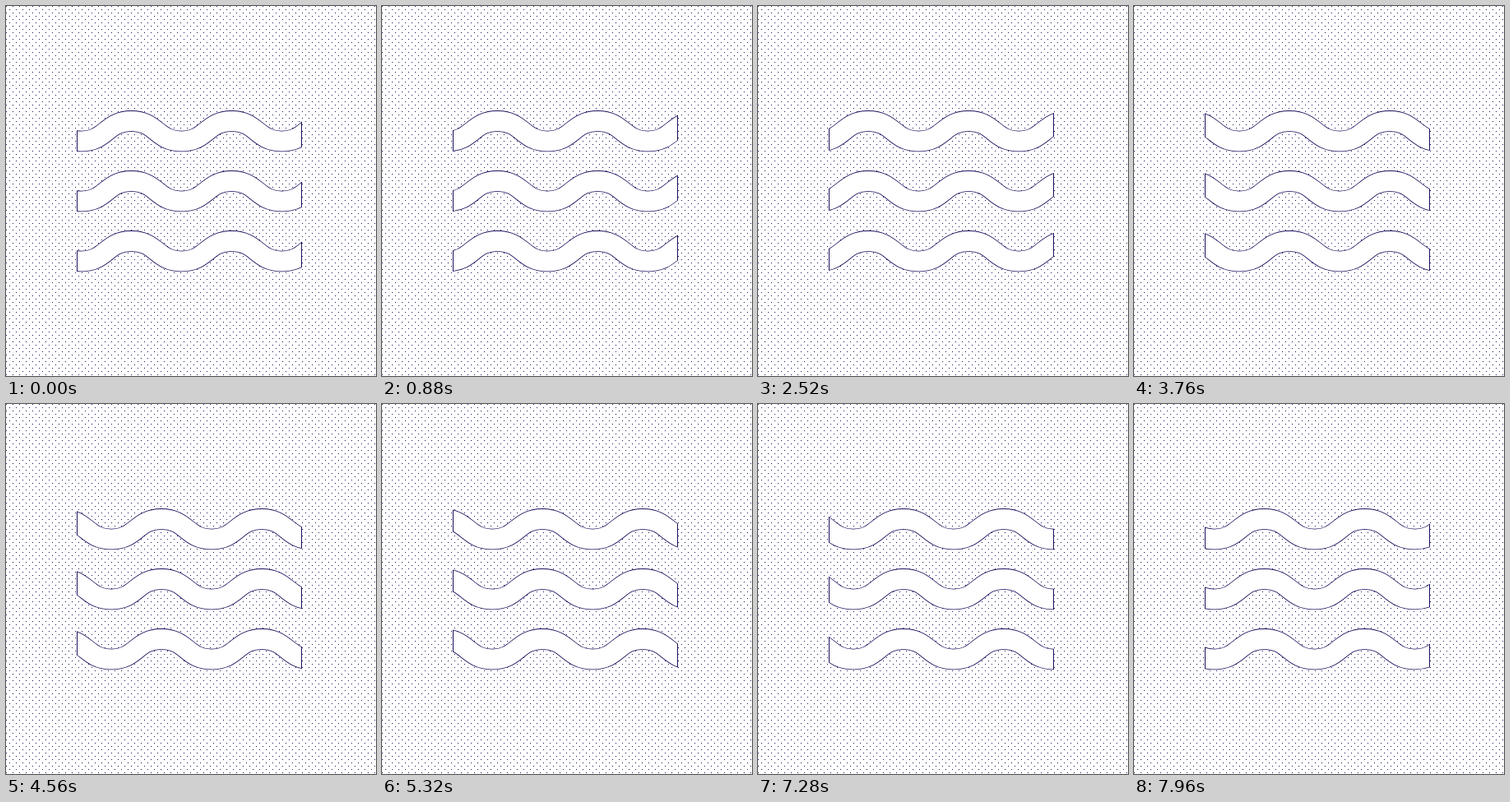
Recreate the animation shown at these times as an HTML page with a canvas. Size 450x450 px, loop 8 s.

```html
<!DOCTYPE html>
<html lang="en">
<head>
<meta charset="utf-8">
<title>Waves</title>
<style>
  html, body { margin: 0; width: 100%; height: 100%; overflow: hidden; background: #fff; }
  canvas { display: block; width: 450px; height: 450px; }
</style>
</head>
<body>
<canvas id="stage" width="450" height="450"></canvas>
<script>
const ctx = document.getElementById('stage').getContext('2d');
const INK = '#18125c';
const LOOP = 8000, STEP = 40;
const TURN = 149;                 // step at which the motion reverses
const PERIOD = 122, HALF = PERIOD / 2, SHIFT = PERIOD / 20;
const AMPLITUDE = 12.3, FIRST_CREST = 152.5;
const LEFT = 87, RIGHT = 359;
const ROWS = [152.2, 225.2, 298.2];

function dotPattern() {
  const tile = document.createElement('canvas');
  tile.width = tile.height = 8;
  const t = tile.getContext('2d');
  t.fillStyle = INK;
  t.fillRect(0, 0, 1, 1);
  t.fillRect(4, 4, 1, 1);
  return ctx.createPattern(tile, 'repeat');
}
const dots = dotPattern();

// Half waves from crest to trough and back, with level handles meeting midway.
function wavePath(y, crest) {
  const path = new Path2D();
  let x = crest - 2 * PERIOD, from = y - AMPLITUDE;
  path.moveTo(x, from);
  for (; x < RIGHT + HALF; x += HALF) {
    const to = 2 * y - from, middle = x + HALF / 2;
    path.bezierCurveTo(middle, from, middle, to, x + HALF, to);
    from = to;
  }
  return path;
}

function band(path, color, width, inset) {
  ctx.save();
  ctx.beginPath();
  ctx.rect(LEFT - 1 + inset, 0, RIGHT - LEFT + 2 - 2 * inset, 450);
  ctx.clip();
  ctx.strokeStyle = color;
  ctx.lineWidth = width;
  ctx.stroke(path);
  ctx.restore();
}

function draw(now) {
  const step = Math.floor(now % LOOP / STEP);
  const travelled = Math.min(step, 2 * TURN - step) * SHIFT;
  const crest = FIRST_CREST - travelled % PERIOD;

  ctx.fillStyle = '#fff';
  ctx.fillRect(0, 0, 450, 450);
  ctx.fillStyle = dots;
  ctx.fillRect(0, 0, 450, 450);
  for (const y of ROWS) {
    const path = wavePath(y, crest);
    band(path, INK, 25.6, 0);
    band(path, '#fff', 24, 1);
  }
}

const start = performance.now();
function tick() {
  draw(performance.now() - start);
  requestAnimationFrame(tick);
}
tick();
</script>
</body>
</html>
```
